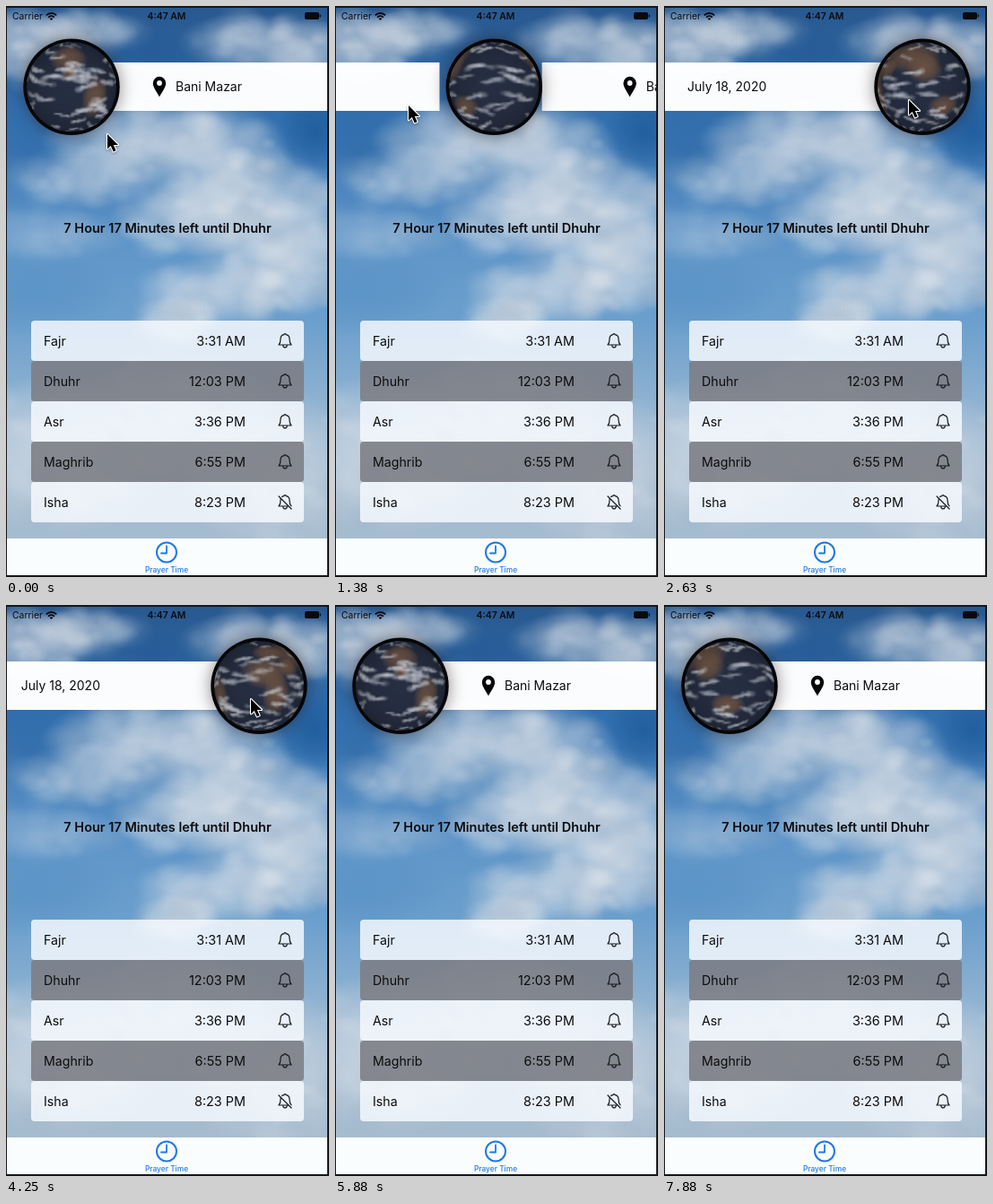
An HTML page with a canvas for the animation above (8000 ms loop, 360 by 637 pixels).

```html
<!DOCTYPE html>
<html lang="en">
<head>
<meta charset="utf-8">
<title>Prayer times</title>
<style>
html, body { margin: 0; width: 100%; height: 100%; overflow: hidden; background: #111; }
canvas { display: block; width: 360px; height: 637px; }
</style>
</head>
<body>
<canvas id="stage" width="360" height="637"></canvas>
<script>
const W = 360, H = 637, LOOP = 8000, TAU = Math.PI * 2;
const ctx = document.getElementById('stage').getContext('2d');

function makeLayer(w, h) {
  const c = document.createElement('canvas');
  c.width = w;
  c.height = h;
  return c.getContext('2d', { willReadFrequently: true });
}

function seeded(seed) {
  return () => {
    seed = (seed * 1664525 + 1013904223) >>> 0;
    return seed / 4294967296;
  };
}

function puff(g, x, y, rx, ry, rgb, alpha) {
  g.save();
  g.translate(x, y);
  g.scale(rx, ry);
  const fade = g.createRadialGradient(0, 0, 0, 0, 0, 1);
  fade.addColorStop(0, `rgba(${rgb},${alpha})`);
  fade.addColorStop(0.5, `rgba(${rgb},${alpha * 0.6})`);
  fade.addColorStop(1, `rgba(${rgb},0)`);
  g.fillStyle = fade;
  g.fillRect(-1, -1, 2, 2);
  g.restore();
}

function makeSky() {
  const g = makeLayer(W, H), rnd = seeded(41);
  const base = g.createLinearGradient(0, 0, 0, H);
  [[0, '#28588f'], [0.2, '#3370af'], [0.4, '#5d94c8'], [0.55, '#6b9fcd'], [0.75, '#9cb9d2'], [1, '#a9bccd']]
    .forEach(([at, color]) => base.addColorStop(at, color));
  g.fillStyle = base;
  g.fillRect(0, 0, W, H);
  const clouds = [
    [25, 45, 75, 42, 0.8], [95, 25, 60, 22, 0.45], [270, 40, 80, 32, 0.5], [335, 50, 60, 35, 0.6],
    [150, 150, 110, 48, 0.7], [90, 190, 90, 36, 0.5], [235, 170, 85, 65, 0.75], [290, 235, 110, 70, 0.85],
    [205, 235, 90, 45, 0.6], [320, 290, 80, 55, 0.75], [235, 320, 90, 40, 0.6], [190, 350, 50, 28, 0.5],
    [40, 255, 100, 30, 0.25], [60, 500, 130, 90, 0.75], [190, 460, 120, 80, 0.6], [300, 520, 110, 90, 0.6]
  ];
  for (const [x, y, rx, ry, a] of clouds) {
    puff(g, x, y, rx, ry, '216,222,229', a);
    for (let i = 0; i < 36; i++) {
      const angle = rnd() * TAU, d = Math.sqrt(rnd()) * 0.85, r = 7 + rnd() * 15;
      const rgb = rnd() < 0.68 ? '222,227,233' : '137,164,192';
      puff(g, x + Math.cos(angle) * rx * d, y + Math.sin(angle) * ry * d, r * 1.3, r, rgb, a * 0.3);
    }
  }
  puff(g, 25, 160, 60, 45, '44,103,165', 0.55);
  puff(g, 345, 140, 45, 48, '30,91,156', 0.85);
  puff(g, 165, 55, 55, 30, '35,88,148', 0.6);
  puff(g, 30, 320, 100, 50, '83,143,196', 0.6);
  return g.canvas;
}

function makeGlobeMap() {
  const g = makeLayer(360, 180), rnd = seeded(9);
  g.fillStyle = '#252d40';
  g.fillRect(0, 0, 360, 180);
  const wrapped = (x, ...rest) => [-360, 0, 360].forEach(dx => puff(g, x + dx, ...rest));
  // longitude, latitude, half width, half height
  const lands = [
    [-100, 42, 32, 24], [-98, 20, 10, 14], [-62, -14, 20, 30], [10, 18, 34, 22], [25, -12, 20, 28],
    [20, 48, 32, 16], [80, 46, 56, 28], [105, 26, 26, 22], [46, 25, 18, 14], [134, -25, 25, 16]
  ];
  for (const [lon, lat, rx, ry] of lands) {
    for (let i = 0; i < 3; i++) wrapped(lon + 180, 90 - lat, rx, ry, '108,83,67', 0.62);
  }
  for (let i = 0; i < 125; i++) {
    let x = rnd() * 360, y = 8 + rnd() * 164;
    const slope = (rnd() - 0.5) * 3, alpha = 0.2 + rnd() * 0.32;
    for (let k = 0; k < 7; k++) {
      wrapped(x, y, 4 + rnd() * 6, 2 + rnd() * 3.5, '206,210,218', alpha);
      x += 3.5;
      y += slope + (rnd() - 0.5) * 3;
    }
  }
  return g.getImageData(0, 0, 360, 180).data;
}

const sky = makeSky();
const globeMap = makeGlobeMap();
const SIZE = 102;
const globe = makeLayer(SIZE, SIZE);
const globeImage = globe.createImageData(SIZE, SIZE);

function renderGlobe(centerLon) {
  const out = globeImage.data, R = SIZE / 2;
  for (let py = 0; py < SIZE; py++) {
    for (let px = 0; px < SIZE; px++) {
      const x = (px + 0.5 - R) / R, y = (py + 0.5 - R) / R;
      const z = Math.sqrt(Math.max(0, 1 - x * x - y * y));
      const lon = Math.atan2(x, z) * 360 / TAU + centerLon + 180;
      const lat = Math.asin(y) * 360 / TAU + 90;
      const u = ((Math.floor(lon) % 360) + 360) % 360;
      const from = (Math.min(179, Math.floor(lat)) * 360 + u) * 4;
      const to = (py * SIZE + px) * 4;
      const light = 0.7 + 0.32 * z;
      for (let c = 0; c < 3; c++) out[to + c] = globeMap[from + c] * light;
      out[to + 3] = 255;
    }
  }
  globe.putImageData(globeImage, 0, 0);
}

function text(str, x, y, size, { weight = 400, align = 'left', color = '#0c0c0e' } = {}) {
  ctx.font = `${weight} ${size}px Inter, "Liberation Sans", sans-serif`;
  ctx.textAlign = align;
  ctx.fillStyle = color;
  ctx.fillText(str, x, y);
}

function at(x, y, draw) {
  ctx.save();
  ctx.translate(x, y);
  draw();
  ctx.restore();
}

function strokePath(d, color, width) {
  ctx.strokeStyle = color;
  ctx.lineWidth = width;
  ctx.lineCap = ctx.lineJoin = 'round';
  ctx.stroke(new Path2D(d));
}

function statusBar() {
  text('Carrier', 7, 15, 10.4);
  text('4:47 AM', 179, 15, 10.4, { weight: 600, align: 'center' });
  at(50.5, 16, () => {
    ctx.strokeStyle = '#0c0c0e';
    ctx.lineWidth = 2;
    ctx.lineCap = 'butt';
    for (const r of [1.5, 4.7, 8]) {
      ctx.beginPath();
      ctx.arc(0, 0, r, -Math.PI * 0.75, -Math.PI * 0.25);
      ctx.stroke();
    }
  });
  ctx.fillStyle = '#080a0e';
  ctx.beginPath();
  ctx.roundRect(333, 7, 16, 8, 2);
  ctx.fill();
  ctx.fillRect(349.7, 9.5, 1.2, 3);
}

function panels(p) {
  const rightStart = 73 + 325 * p, leftEnd = 288 - 333 * (1 - p);
  ctx.fillStyle = 'rgba(255,255,255,.98)';
  ctx.fillRect(rightStart, 63, W, 54);
  ctx.fillRect(leftEnd - W, 63, W, 54);
  at(rightStart + 98, 90, () => {
    ctx.fillStyle = '#060606';
    ctx.fill(new Path2D('M0 11.5C-2 7-7.2 1-7.2-4A7.2 7.2 0 0 1 7.2-4C7.2 1 2 7 0 11.5Z'));
    ctx.fillStyle = '#fff';
    ctx.beginPath();
    ctx.arc(0, -4, 2.9, 0, TAU);
    ctx.fill();
  });
  text('Bani Mazar', rightStart + 116, 95.3, 14);
  text('July 18, 2020', leftEnd - 262, 95.3, 14);
}

function ball(x) {
  const y = 90.3;
  ctx.save();
  ctx.shadowColor = 'rgba(40,25,25,.5)';
  ctx.shadowBlur = 18;
  ctx.fillStyle = '#050608';
  ctx.beginPath();
  ctx.arc(x, y, 53.7, 0, TAU);
  ctx.fill();
  ctx.restore();
  ctx.save();
  ctx.beginPath();
  ctx.arc(x, y, 50, 0, TAU);
  ctx.clip();
  ctx.drawImage(globe.canvas, x - SIZE / 2, y - SIZE / 2);
  ctx.restore();
}

function bell(y, muted) {
  at(311, y, () => {
    strokePath('M-7 4.5C-5 2.5-5 1-5-2C-5-5-3-6.5-1.2-6.8C-1.2-8.3 1.2-8.3 1.2-6.8C3-6.5 5-5 5-2C5 1 5 2.5 7 4.5Z' +
      'M-2.2 5.2C-2 8.2 2 8.2 2.2 5.2', '#15171a', 1.2);
    if (muted) {
      strokePath('M-6.3-7.3L7.7 6.7', '#e8eef4', 1.6);
      strokePath('M-7-6.5L7 7.5', '#15171a', 1.2);
    }
  });
}

function prayerRows(muted) {
  const rows = [['Fajr', '3:31 AM'], ['Dhuhr', '12:03 PM'], ['Asr', '3:36 PM'], ['Maghrib', '6:55 PM'], ['Isha', '8:23 PM']];
  rows.forEach(([name, time], i) => {
    const y = 351 + i * 45;
    ctx.fillStyle = i % 2 ? 'rgba(124,126,133,.87)' : 'rgba(247,251,255,.83)';
    ctx.beginPath();
    ctx.roundRect(28, y, 304, 45, 4);
    ctx.fill();
    text(name, 42, y + 28, 14.2);
    text(time, 267, y + 28, 14.4, { align: 'right' });
    bell(y + 22.5, muted && i === 4);
  });
}

function tabBar() {
  const blue = '#1f78e6';
  ctx.fillStyle = '#fafdfe';
  ctx.fillRect(0, 594, W, 41);
  at(179, 609.5, () => {
    ctx.strokeStyle = blue;
    ctx.lineWidth = 2;
    ctx.beginPath();
    ctx.arc(0, 0, 11, 0, TAU);
    ctx.stroke();
    strokePath('M0-7V1H-6', blue, 1.8);
  });
  text('Prayer Time', 179, 632, 8.4, { weight: 500, align: 'center', color: blue });
}

function bezel() {
  ctx.fillStyle = '#15171b';
  ctx.fillRect(0, 0, W, 2);
  ctx.fillRect(0, 0, 1, H);
  ctx.fillRect(358, 0, 2, H);
  ctx.fillRect(0, 635, W, 2);
}

function pointer(x, y) {
  at(x, y, () => {
    ctx.shadowColor = 'rgba(0,0,0,.35)';
    ctx.shadowBlur = 3;
    ctx.shadowOffsetY = 1;
    const d = 'M1 1V17.5L4.8 14L7.7 20.5L10.6 19.2L7.8 12.9H13Z';
    strokePath(d, '#fff', 2.2);
    ctx.shadowColor = 'transparent';
    ctx.fillStyle = '#000';
    ctx.fill(new Path2D(d));
  });
}

const clamp = v => Math.min(1, Math.max(0, v));
const ease = v => v * v * (3 - 2 * v);

function heldTime(t) {
  const holds = t < 1000 ? [0, 130, 250] : t >= 1750 && t < 4250 ? [1750, 1880, 2250, 2630] : null;
  return holds ? holds.filter(v => v <= t).pop() : Math.floor(t / 125) * 125;
}

// time, x, y
const pointerPath = [
  [0, 112, 142], [250, 81, 110], [1700, 81, 110], [2250, 268, 108], [2630, 272, 104], [4300, 272, 104],
  [4650, 375, 150], [6125, 375, 430], [6600, 310, 548], [7000, 310, 548], [7500, 375, 600], [8000, 375, 600]
];

function pointerAt(t) {
  const i = pointerPath.findIndex(([time]) => time > t);
  const [t0, x0, y0] = pointerPath[i - 1], [t1, x1, y1] = pointerPath[i];
  const k = ease((t - t0) / (t1 - t0));
  return [x0 + (x1 - x0) * k, y0 + (y1 - y0) * k];
}

let shown = -1;

function draw(t) {
  const slide = ease(clamp((t - 1130) / 500)) - ease(clamp((t - 4200) / 500));
  renderGlobe(-95 - t * 0.062);
  ctx.drawImage(sky, 0, 0);
  statusBar();
  panels(slide);
  ball(73 + 215 * slide);
  text('7 Hour 17 Minutes left until Dhuhr', 180, 252.5, 14.5, { weight: 600, align: 'center' });
  prayerRows(t < 6750);
  tabBar();
  bezel();
  pointer(...pointerAt(t));
}

function tick() {
  const t = heldTime(performance.now() % LOOP);
  if (t !== shown) {
    shown = t;
    draw(t);
  }
  requestAnimationFrame(tick);
}
tick();
</script>
</body>
</html>
```
